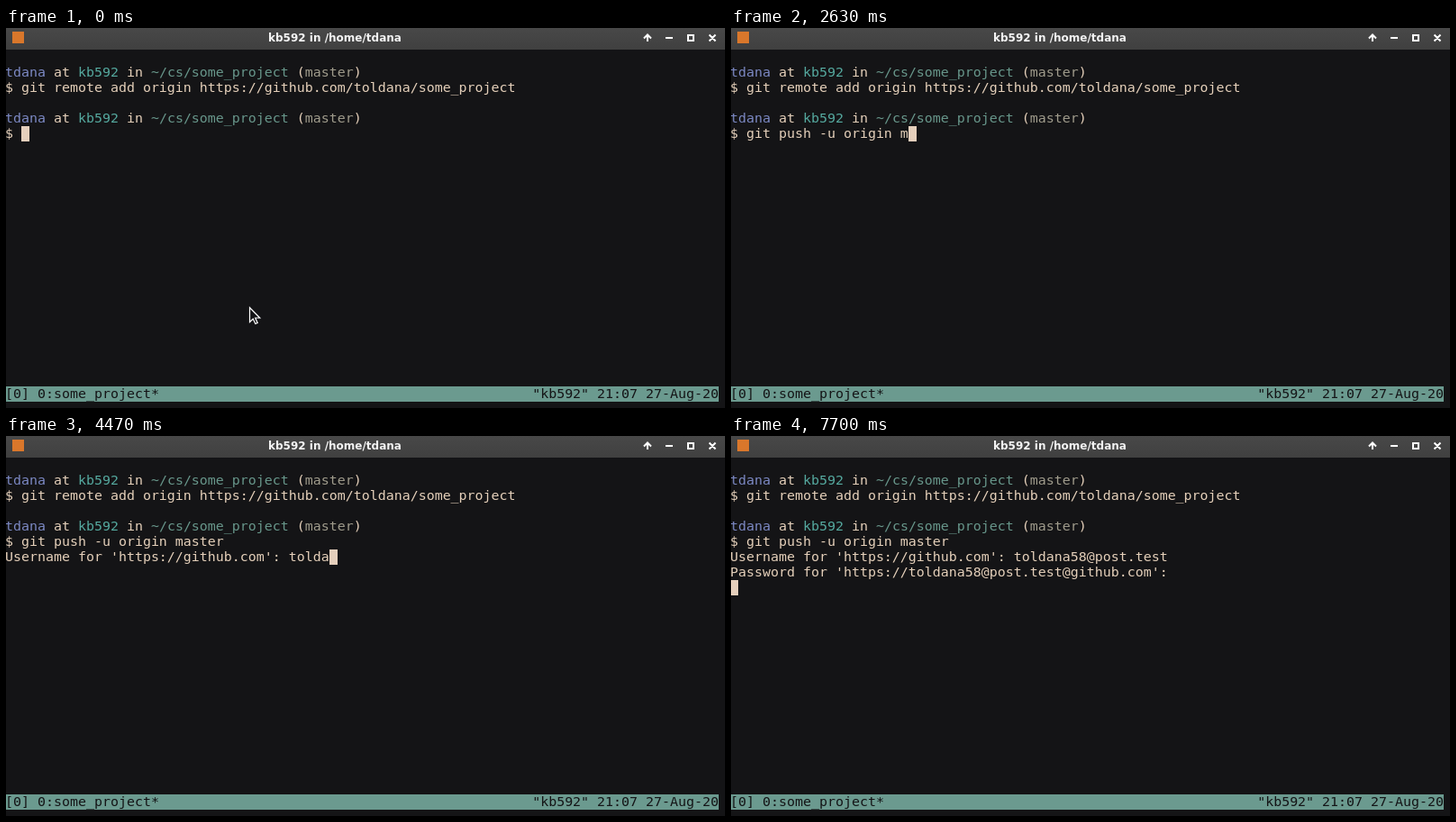
Animation of 798x422 px, one loop 8 s. Source, as an HTML page:

```html
<!DOCTYPE html>
<html lang="en">
<head>
<meta charset="utf-8">
<title>Terminal</title>
<style>
html, body { margin: 0; width: 100%; height: 100%; overflow: hidden; background: #141416; }
#bar {
  position: absolute; inset: 0 0 auto; height: 24px;
  background: linear-gradient(#484848, #404040);
  color: #f4f4f4; font: bold 12px/22px "DejaVu Sans", sans-serif;
}
#bar b { position: absolute; left: 291px; white-space: pre; }
#icon { position: absolute; left: 7px; top: 4px; width: 13px; height: 13px; background: #d9772b; }
svg { position: absolute; left: 0; top: 0; }
#term, #status {
  position: absolute; left: -1px; margin: 0; white-space: pre; color: #e5d0ba;
  font: 14.95px/17px "DejaVu Sans Mono", monospace; font-variant-ligatures: none;
}
#term { top: 24px; }
#status {
  top: 398px; width: 792px; height: 17px; background: #6b9a8f; color: #141416;
  display: flex; justify-content: space-between;
}
#cursor { position: absolute; width: 9px; height: 17px; background: #e5cfbc; }
.user { color: #7c89c4; }
.host { color: #55a99f; }
.path { color: #68978b; }
.branch { color: #a09c8c; }
</style>
</head>
<body>
<div id="bar"><i id="icon"></i><b>kb592 in /home/tdana</b></div>
<pre id="term"><span id="text"></span><i id="cursor"></i></pre>
<div id="status"><span>[0] 0:some_project*</span><span>"kb592" 21:07 27-Aug-20</span></div>
<svg width="798" height="422" fill="none" stroke="#fff" stroke-width="2">
  <path d="M712 15V8M708 11.5L712 7.5L716 11.5M732 11H740M757 8H763V14H757ZM780.5 7.5L787.5 14.5M787.5 7.5L780.5 14.5"/>
  <path id="mouse" d="M270.5 310.5V326.5L274.2 323L276.8 328.5L279.2 327.4L276.7 322H281.8Z" fill="#141416" stroke-width="1.2"/>
</svg>
<script>
const $ = id => document.getElementById(id);
const LOOP = 8000;
const command = 'git push -u origin master';
const login = 'toldana58@post.test';

const span = (cls, s) => `<span class="${cls}">${s}</span>`;
const prompt = `${span('user', 'tdana')} at ${span('host', 'kb592')} in ` +
  `${span('path', '~/cs/some_project')} (${span('branch', 'master')})\n$ `;
const history = `\n${prompt}git remote add origin https://github.com/toldana/some_project\n\n${prompt}`;
const askUser = "Username for 'https://github.com': ";
const askPass = `Password for 'https://${login}@github.com': `;

// Each key is [time, characters typed so far].
const commandKeys = [
  [330, 1], [400, 2], [470, 3], [570, 4], [630, 5], [700, 6], [800, 7],
  [1130, 9], [1230, 11], [1330, 13], [1530, 15], [1730, 17], [1930, 18], [2300, 19],
  [2630, 20], [2730, 21], [2830, 22], [2930, 23], [3030, 25]
];
const loginKeys = [
  [4030, 1], [4130, 2], [4270, 3], [4370, 4], [4470, 5], [4570, 7], [4800, 8], [4870, 9],
  [5030, 10], [5130, 11], [5230, 12], [5330, 13], [5430, 14], [5530, 16], [5730, 17], [5830, 19]
];

const typed = (s, keys, t) => s.slice(0, keys.reduce((n, [at, count]) => t >= at ? count : n, 0));

function draw(t) {
  const lines = ['$ ' + typed(command, commandKeys, t)];
  if (t >= 3130) lines.push(t < 3400 ? '' : askUser + typed(login, loginKeys, t));
  if (t >= 6100) lines.push(askPass);
  if (t >= 7700) lines.push('');
  $('text').innerHTML = history + lines.join('\n').slice(2);
  $('cursor').style.left = lines.at(-1).length * 9 + 'px';
  $('cursor').style.top = (lines.length + 4) * 17 + 'px';
  $('mouse').style.display = t < 330 ? '' : 'none';
}

const start = performance.now();
function tick() {
  draw((performance.now() - start) % LOOP);
  requestAnimationFrame(tick);
}
tick();
</script>
</body>
</html>
```
